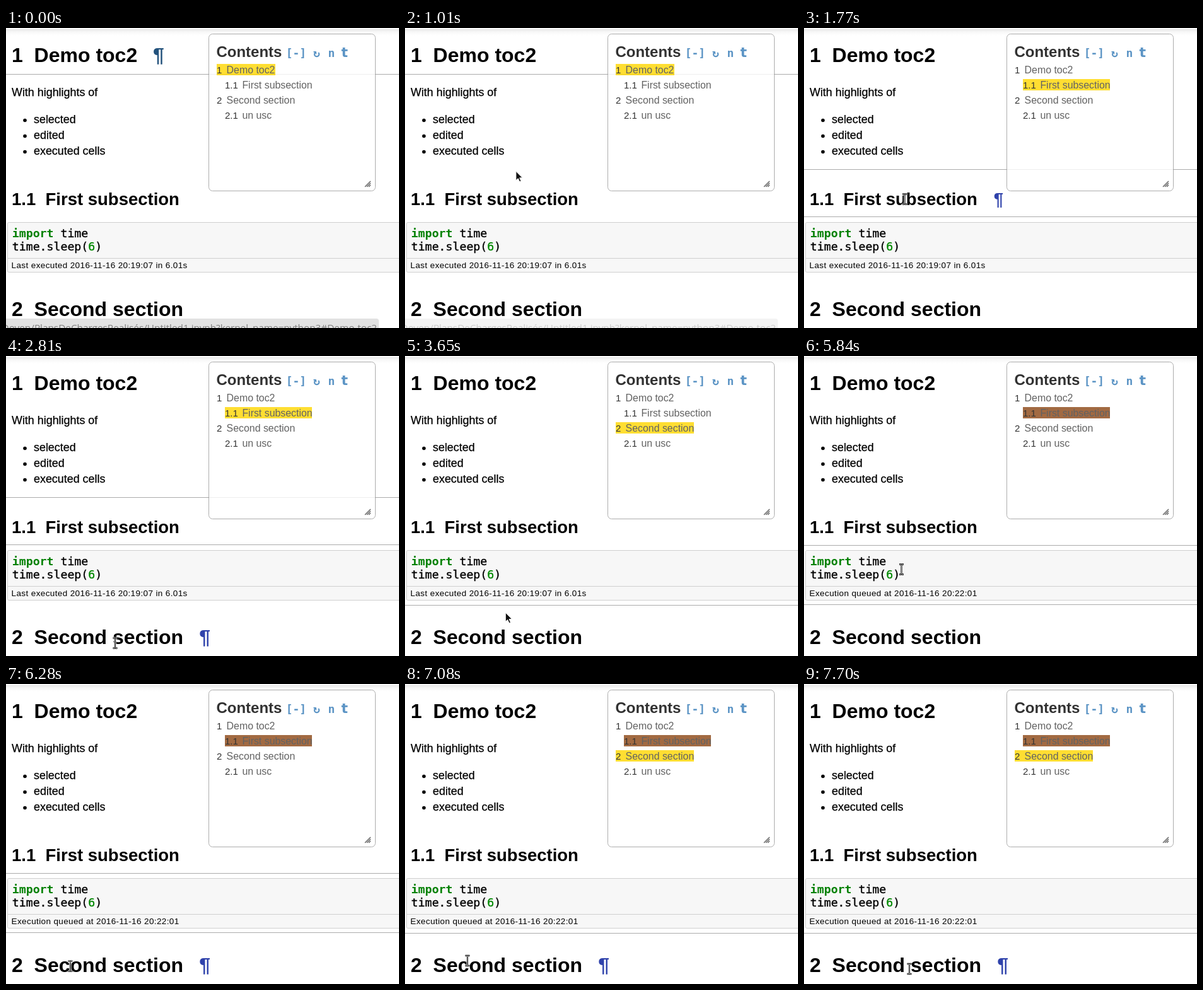
An HTML page that plays this animation: 623 px wide and 476 px high, repeating every 8 s.

```html
<!DOCTYPE html>
<html lang="en">
<head>
<meta charset="utf-8">
<title>Table of contents highlights</title>
<style>
  html, body { margin: 0; width: 100%; height: 100%; overflow: hidden; background: #fff; }
  svg { display: block; width: 623px; height: 476px; font-family: "Liberation Sans", Arial, sans-serif; }
  text { white-space: pre; }
  .h1 { font-size: 32px; font-weight: bold; }
  .h2 { font-size: 27.5px; font-weight: bold; }
  .body { font-size: 17.9px; }
  .body text { stroke: #000; stroke-width: .25px; }
  .code { font: 18.2px "DejaVu Sans Mono", monospace; stroke: #000; stroke-width: .35px; }
  .key { font-weight: bold; fill: #008000; stroke: none; }
  .num { fill: #080; stroke: #080; }
  .log { font-size: 13.5px; letter-spacing: .38px; }
  .link { font: bold 18px "DejaVu Sans Mono", monospace; fill: #337ab7; }
  .link .big { font: bold 22px "DejaVu Sans", sans-serif; }
  .item { font-size: 15.9px; }
  .no { font-size: 15px; }
  .name { fill: #3c3c3c; }
  .status { font: 15.3px "Open Sans", "Noto Sans", sans-serif; fill: #808080; text-anchor: end; }
  .mark { fill: #2f42ab; }
</style>
</head>
<body>
<svg viewBox="0 0 623 476">
  <defs>
    <linearGradient id="shade" x2="0" y2="1">
      <stop stop-color="#ebebeb"/><stop offset=".5" stop-color="#f9f9f9"/><stop offset="1" stop-color="#fff"/>
    </linearGradient>
  </defs>
  <rect y="2" width="623" height="10" fill="url(#shade)"/>
  <rect y="2" width="623" height="1" fill="#e5e5e5"/>
  <rect id="lineA" width="623" height="1"/>
  <rect id="lineB" width="623" height="1"/>

  <text class="h1" x="9" y="54">1&nbsp;&nbsp;Demo toc2</text>
  <text class="h1 mark" x="233" y="54">¶</text>
  <g class="body">
    <text x="9" y="108">With highlights of</text>
    <circle cx="30" cy="146.5" r="2.8"/><text x="44" y="151">selected</text>
    <circle cx="30" cy="171.5" r="2.8"/><text x="44" y="176">edited</text>
    <circle cx="30" cy="196.5" r="2.8"/><text x="44" y="201">executed cells</text>
  </g>
  <text class="h2" x="9" y="280.5">1.1&nbsp;&nbsp;First subsection</text>
  <text class="h2 mark" x="300.7" y="280.5">¶</text>

  <rect x="2.5" y="308.5" width="640" height="79" rx="2" fill="#f7f7f7" stroke="#cfcfcf"/>
  <rect x="3" y="365" width="620" height="1" fill="#cfcfcf"/>
  <text class="code" x="9.8" y="332"><tspan class="key">import</tspan> time</text>
  <text class="code" x="9.8" y="353">time.sleep(<tspan class="num">6</tspan>)</text>
  <text class="log" id="log" x="8.6" y="381"></text>

  <text class="h1" x="9" y="457">2&nbsp;&nbsp;Second section</text>
  <text class="h1 mark" x="306.3" y="457">¶</text>

  <g opacity=".8">
    <rect x="321.5" y="9.5" width="264" height="249" rx="6" fill="#fff" stroke="#999"/>
    <text x="333.4" y="46" font-size="24" font-weight="bold">Contents</text>
    <g class="link">
      <text x="443.7" y="46">[-]</text>
      <text x="487" y="46">↻</text>
      <text x="510.5" y="46">n</text>
      <text class="big" x="531.5" y="46">t</text>
    </g>
    <rect class="hl" x="334" y="57" width="93" height="18"/>
    <rect class="hl" x="347" y="81" width="138" height="18"/>
    <rect class="hl" x="334" y="105" width="124" height="18"/>
    <g class="item">
      <text class="no" x="334" y="72">1</text><text class="name" x="349.6" y="72">Demo toc2</text>
      <text class="no" x="347" y="96">1.1</text><text class="name" x="374.4" y="96">First subsection</text>
      <text class="no" x="334" y="120">2</text><text class="name" x="349.6" y="120">Second section</text>
      <text class="no" x="347" y="144">2.1</text><text class="name" x="374.4" y="144">un usc</text>
    </g>
    <path d="M569 252L578 243M572 252L578 246M575 252L578 249" stroke="#333" stroke-width="1.3"/>
  </g>

  <g id="status">
    <path d="M0 461H587Q591 461 591 465V476H0Z" fill="#e2e2e2"/>
    <text class="status" x="588" y="480.5">Doyen/PlansDeChargesRealisés/Untitled1.ipynb?kernel_name=python3#Demo-toc2</text>
  </g>

  <g id="arrow">
    <path d="M0 0V14.5L3.4 11.4L5.8 16.8L8.2 15.7L5.8 10.5H10.4Z" fill="#111" stroke="#fff" stroke-width="1"/>
  </g>
  <g id="beam" fill="none">
    <path d="M-3.5-8H-1L0-7L1-8H3.5M0-7V7M-3.5 8H-1L0 7L1 8H3.5" stroke="#fff" stroke-width="3.4"/>
    <path d="M-3.5-8H-1L0-7L1-8H3.5M0-7V7M-3.5 8H-1L0 7L1 8H3.5" stroke="#000" stroke-width="2.3"/>
    <path d="M-3-8H-1L0-7L1-8H3M0-7V7M-3 8H-1L0 7L1 8H3" stroke="#fff" stroke-width=".7"/>
  </g>
</svg>
<script>
const LOOP = 8000;
const $ = id => document.getElementById(id);
const all = sel => [...document.querySelectorAll(sel)];
const marks = all('.mark'), bands = all('.hl');
const show = (el, on) => { el.style.display = on ? '' : 'none'; };

const GRAY = '#ababab', GREEN = '#66bb6a';
const GOLD = '#ffd700', BROWN = '#8b4513';
const LAST = 'Last executed 2016-11-16 20:19:07 in 6.01s';
const QUEUED = 'Execution queued at 2016-11-16 20:22:01';

const states = [
  { at: 0, lines: [73], color: GRAY, rows: [GOLD], log: LAST },
  { at: 1770, lines: [224, 299], color: GRAY, rows: [, GOLD], log: LAST },
  { at: 3120, lines: [395], color: GRAY, rows: [, , GOLD], log: LAST },
  { at: 4050, lines: [300, 394], color: GREEN, rows: [, GOLD], log: LAST },
  { at: 5080, lines: [300, 394], color: GRAY, rows: [, BROWN], log: QUEUED },
  { at: 7080, lines: [395], color: GRAY, rows: [, BROWN, GOLD], log: QUEUED }
];

// Pointer moves: [time, x, y], at rest between moves.
const moves = [
  [[650, 242, 46], [1010, 176, 227], [1320, 159.5, 271.5]],
  [[2110, 159.5, 271.5], [2350, 156, 325], [2810, 173, 455.5]],
  [[3370, 173, 455.5], [4050, 136, 325]],
  [[4350, 136, 325], [4540, 154.5, 338.5]],
  [[5840, 154.5, 338.5], [6280, 102, 447.5], [6430, 79, 450], [6630, 99, 439]],
  [[7460, 99, 439], [7700, 167, 452]]
];

// Hover zones of the headings: top, bottom.
const headings = [[27, 62], [253, 289], [428, 470]];
// Selectable text: top, bottom, right edge.
const textZones = [
  [30, 60, 209], [92, 114, 147], [135, 206, 157], [257, 287, 276],
  [309, 365, 623], [367, 386, 288], [430, 462, 282]
];

function slope(pts, i, k) {
  const a = pts[i - 1], b = pts[i + 1];
  return a && b ? (b[k] - a[k]) / (b[0] - a[0]) : 0;
}

function hermite(pts, i, k, t) {
  const a = pts[i], b = pts[i + 1], d = b[0] - a[0];
  const u = (t - a[0]) / d, v = 1 - u;
  return v * v * (1 + 2 * u) * a[k] + u * u * (3 - 2 * u) * b[k]
    + d * u * v * (v * slope(pts, i, k) - u * slope(pts, i + 1, k));
}

function pointer(t) {
  const pts = moves.filter(m => m[0][0] <= t).pop() || moves[0];
  const end = pts[pts.length - 1];
  if (t >= end[0]) return [end[1], end[2]];
  if (t <= pts[0][0]) return [pts[0][1], pts[0][2]];
  const i = pts.findIndex(p => p[0] > t) - 1;
  return [hermite(pts, i, 1, t), hermite(pts, i, 2, t)];
}

function drawState(s) {
  [$('lineA'), $('lineB')].forEach((line, i) => {
    show(line, i < s.lines.length);
    line.setAttribute('y', s.lines[i] || 0);
    line.setAttribute('fill', s.color);
  });
  bands.forEach((band, i) => band.setAttribute('fill', s.rows[i] || 'none'));
  if ($('log').textContent !== s.log) $('log').textContent = s.log;
}

function drawPointer(t) {
  const [x, y] = pointer(t);
  const overText = textZones.some(([top, bottom, right]) => y >= top && y <= bottom && x <= right);
  const place = `translate(${x.toFixed(1)} ${y.toFixed(1)})`;
  for (const id of ['arrow', 'beam']) {
    $(id).setAttribute('transform', place);
    show($(id), t >= 650 && (id === 'beam') === overText);
  }
  marks.forEach((mark, i) => {
    const [top, bottom] = headings[i];
    show(mark, y >= top && y <= bottom);
    mark.style.fill = i === 0 && x > 233 ? '#23527c' : '';
  });
}

function draw(t) {
  drawState(states.filter(s => s.at <= t).pop());
  drawPointer(t);
  $('status').setAttribute('opacity', Math.max(0, Math.min(1, (1090 - t) / 200)));
}

const start = performance.now();
function tick() {
  draw((performance.now() - start) % LOOP);
  requestAnimationFrame(tick);
}
tick();
</script>
</body>
</html>
```
